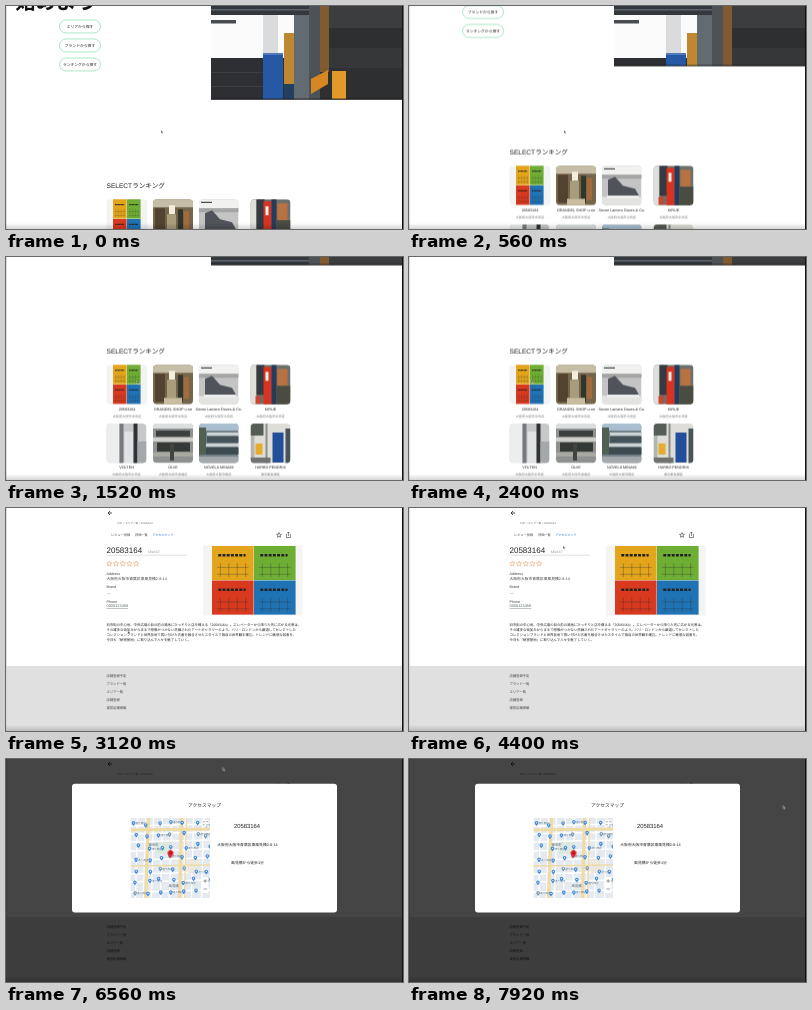
An HTML page that plays this animation: 397x223 px, repeating every 8 s.

```html
<!DOCTYPE html>
<html lang="ja">
<head>
<meta charset="utf-8">
<title>ショップ検索</title>
<style>
html, body { margin: 0; width: 100%; height: 100%; overflow: hidden; background: #fff; }
svg { display: block; width: 100vw; height: 100vh; text-rendering: geometricPrecision;
  font-family: "Liberation Sans", "Noto Sans CJK JP", "Noto Sans CJK", sans-serif; }
#scroll, #cursor { animation: 8s linear infinite; }
#scroll { animation-name: scroll; }
#cursor { animation-name: move; }
.late { opacity: 0; animation: 8s step-end infinite; }
#detail { animation-name: open-detail; }
#modal { animation-name: open-modal; }
#pin { animation-name: drop-pin; }
#roads { animation: pale 8s step-end infinite; }
@keyframes scroll {
  0% { transform: translateY(0); }
  1% { transform: translateY(-2px); }
  4% { transform: translateY(-15px); }
  7% { transform: translateY(-33.5px); }
  11% { transform: translateY(-61px); }
  15% { transform: translateY(-79px); }
  19%, 100% { transform: translateY(-85.5px); }
}
@keyframes move {
  0%, 12% { transform: translate(155px, 124.3px); }
  19%, 23% { transform: translate(131px, 124px); }
  29%, 45% { transform: translate(122px, 123px); }
  52%, 55% { transform: translate(154px, 38px); }
  58%, 70% { transform: translate(155.5px, 28px); }
  76% { transform: translate(184px, 12px); }
  82% { transform: translate(216.5px, 8.5px); }
  91% { transform: translate(312px, 5px); }
  95% { transform: translate(356px, 18px); }
  99%, 100% { transform: translate(374px, 46.5px); }
}
@keyframes open-detail { 0% { opacity: 0; } 34%, 100% { opacity: 1; } }
@keyframes open-modal { 0% { opacity: 0; } 60%, 100% { opacity: 1; } }
@keyframes drop-pin { 0% { opacity: 0; } 68%, 100% { opacity: 1; } }
@keyframes pale { 0% { stroke: #efc877; } 68%, 100% { stroke: #efdba6; } }
</style>
</head>
<body>
<svg id="stage" viewBox="0 0 397 223" preserveAspectRatio="none"></svg>
<script>
const shop = '20583164';
const address = '大阪府大阪市青葉区東風見橋2-8-14';

const rect = (x, y, w, h, fill, more = '') =>
  `<rect x="${x}" y="${y}" width="${w}" height="${h}" fill="${fill}" ${more}/>`;
const text = (x, y, size, str, fill = '#222', more = '') =>
  `<text x="${x}" y="${y}" font-size="${size}" fill="${fill}" ${more}>${str.replace(/&/g, '&amp;').replace(/>/g, '&gt;')}</text>`;
const middle = 'text-anchor="middle"';
const medium = 'font-weight="500"';
const line = (d, stroke, width = .6, more = '') =>
  `<path d="${d}" fill="none" stroke="${stroke}" stroke-width="${width}" ${more}/>`;

let seed = 11;
const random = () => (seed = seed * 16807 % 2147483647) / 2147483647;

// A rounded picture made of flat blocks: [colour, x, y, w, h]
let clips = 0;
function photo(x, y, w, h, back, blocks, radius = 4) {
  const id = 'clip' + clips++;
  return `<clipPath id="${id}">${rect(0, 0, w, h, '#000', `rx="${radius}"`)}</clipPath>
    <g transform="translate(${x} ${y})"><g clip-path="url(#${id})">${rect(0, 0, w, h, back)}
    ${blocks.map(([c, ...box]) => rect(...box, c)).join('')}</g></g>`;
}

function poster(x, y, w, h) {
  const colours = ['#e3a51c', '#6fae35', '#d8391f', '#1f73b5'];
  return colours.map((c, i) => {
    const tw = w / 2, th = h / 2, tx = x + i % 2 * tw, ty = y + (i >> 1) * th;
    const mark = `M${tx + tw * .15} ${ty + th * .27}h${tw * .65}`;
    const fence = `M${tx + tw * .12} ${ty + th * .62}h${tw * .75}m0 ${th * .2}h${-tw * .75}`;
    const posts = [.2, .4, .6, .8].map(k => `M${tx + tw * k} ${ty + th * .5}v${th * .4}`).join('');
    return rect(tx, ty, tw - .4, th - .4, c) +
      line(mark, '#222', h * .035, `stroke-dasharray="${tw * .07} ${tw * .03}"`) +
      line(fence + posts, '#333', h * .007, 'opacity=".7"');
  }).join('');
}

// Stays fixed while the page slides over its lower edge
function hero() {
  return photo(205, 0, 191, 94, '#2d2f31', [
    ['#fbfbfb', 0, 9, 84, 43], ['#33383f', 0, 0, 98, 9], ['#5d636b', 0, 3, 98, 1.5],
    ['#484b4f', 0, 14, 25, 3.5], ['#d9dbdc', 52, 9, 15, 38], ['#2d2f32', 0, 52.5, 52, 42],
    ['#3c3f42', 0, 66, 52, 1], ['#3c3f42', 0, 80, 52, 1], ['#2559a6', 52, 47, 20, 47],
    ['#4f7cb8', 52, 47, 20, 2], ['#bf8830', 73, 27, 10, 51], ['#24405f', 73, 78, 10, 16],
    ['#626a72', 83, 9, 15, 85], ['#4d5257', 98, 0, 11, 94], ['#805a30', 109, 0, 9, 66],
    ['#3b3d3f', 118, 0, 73, 22], ['#353739', 118, 42, 73, 20], ['#e0992a', 121, 65, 14, 28]
  ], 0) + '<path d="M305 73l17-9v14l-17 10z" fill="#d78624"/>';
}

function card(x, w, y, name, area, back, blocks) {
  const centre = x + w / 2;
  const picture = blocks ? photo(x, y, w, 39.5, back, blocks)
    : rect(x, y, w, 39.5, '#f3f3f3', 'rx="4"') + poster(x + 6.5, y, 28, 39.5);
  return picture + text(centre, y + 45.3, 3.75, name, '#222', middle) +
    text(centre, y + 52.3, 3.2, area, '#777', middle);
}

function listPage() {
  const buttons = ['エリアから探す', 'ブランドから探す', 'ランキングから探す'].map((s, i) =>
    rect(53.5, 14 + i * 19, 41, 13, '#fff', 'rx="6.5" stroke="#9adfb8" stroke-width=".8"') +
    text(74, 21.9 + i * 19, 3.8, s, '#222', middle + ' ' + medium)).join('');
  const top = 193.3, low = 252, osaka = '大阪府大阪市中央区';
  const cards = [
    card(100.5, 41, top, shop, osaka),
    card(147, 40, top, 'GRANDEL SHOP u-ne', osaka, '#75664b', [
      ['#c5bda5', 0, 0, 40, 8], ['#51432f', 2, 9, 10, 28], ['#f3eedc', 16, 6, 6, 9],
      ['#a89c7d', 14, 15, 9, 18], ['#30362c', 25, 10, 5, 27], ['#a36b3b', 31, 12, 5, 22],
      ['#c9bd9f', 11, 33, 18, 7]]),
    card(193, 39.5, top, 'Seven Lantern Doves & Co.', osaka, '#c3c4c3', [
      ['#f1f1ef', 0, 0, 40, 9], ['#44484a', 2, 2.5, 11, 1.2], ['#a4a6a5', 0, 9, 40, 4],
      ['#e3e3e1', 0, 31, 40, 9]]) +
      `<path d="M199 ${top + 30}v-16l7-3 8 9 12 3 4 7z" fill="#50545a"/>` +
      line(`M198 ${top + 31}h32`, '#f7f7f7', 2),
    card(244.5, 40, top, 'KIRUE', osaka, '#6c706b', [
      ['#dededa', 0, 0, 6, 40], ['#343a3f', 6, 0, 8, 30], ['#d63322', 13, 2, 8, 38],
      ['#f1eee8', 15, 7, 3, 9], ['#263b58', 21, 0, 5, 40], ['#b87242', 27, 4, 10, 17],
      ['#4a4c42', 26, 21, 14, 19], ['#c74630', 5, 31, 5, 8]]),
    card(100.5, 40, low, 'VOLTEN', osaka, '#c6c8c9', [
      ['#eceded', 0, 0, 13, 40], ['#777a7c', 13, 0, 4, 40], ['#e0e2e3', 18, 8, 9, 32],
      ['#303335', 27, 0, 4, 40], ['#a4a8aa', 31, 18, 9, 22]]),
    card(147, 40, low, 'OLVE', '大阪府大阪市浪速区', '#8e918f', [
      ['#dcdfdf', 0, 0, 40, 5], ['#3c403f', 3, 7, 34, 6], ['#d0d1cd', 0, 14, 40, 4],
      ['#343836', 4, 19, 33, 9], ['#aaa9a2', 0, 29, 40, 4], ['#41443f', 17, 20, 4, 17]]),
    card(193, 39.5, low, 'NOVELA MINAMI', '大阪府大阪市西区', '#718089', [
      ['#a9bfd0', 0, 0, 40, 7], ['#d0d4d4', 8, 9, 32, 3], ['#46535b', 8, 13, 32, 6],
      ['#cdd2d3', 4, 20, 36, 3], ['#3d4b50', 7, 24, 33, 7], ['#506052', 0, 4, 7, 27],
      ['#a3a9aa', 0, 33, 40, 7]]),
    card(244.5, 40, low, 'HARBO PENDRIX', '東京都目黒区', '#deddd8', [
      ['#565c56', 0, 0, 13, 12], ['#b4b6b2', 0, 12, 4, 28], ['#e6ac2e', 5, 20, 7, 11],
      ['#8b8e8b', 15, 0, 2, 40], ['#234e99', 22, 9, 11, 30], ['#4a5358', 35, 5, 5, 35],
      ['#6e7370', 0, 34, 20, 6]])
  ].join('');
  return rect(205, 93.5, 191, 230, '#fff') + rect(205, 92.7, 191, .9, '#111') +
    text(9, 3, 20.5, '始めよう', '#111', 'font-weight="700"') + buttons +
    text(100.5, 182, 6.6, 'SELECTランキング', '#222', medium) + cards;
}

function star(cx, cy, r) {
  return 'M' + Array.from({ length: 10 }, (_, i) => {
    const a = i * Math.PI / 5, k = i % 2 ? r * .45 : r;
    return `${cx + k * Math.sin(a)} ${cy - k * Math.cos(a)}`;
  }).join('L') + 'z';
}

function detailPage() {
  const story = [
    `旧市街の中心地、中央広場の目の前の路地にひっそりと店を構える『${shop}』。エレベーターから降りた先に広がる光景は、`,
    'その雑多な街並みからまるで想像がつかない洗練されたアートギャラリーのよう。パリ・ロンドンから厳選してセレクトした',
    'コレクションブランドと世界各地で買い付けた古着を融合させたスタイルで独自の世界観を確立。トレンドに敏感な若者を、',
    '今日も『秘密基地』に取り込んで人々を魅了していく。'];
  const links = ['店舗登録予定', 'ブランド一覧', 'エリア一覧', '店舗登録', '運営店舗掲載'];
  return rect(0, 0, 397, 223, '#fff') + rect(0, 158, 397, 65, '#e0e0e0') +
    line('M106 5h-4m2-2l-2 2 2 2', '#222', .8) +
    text(111, 16, 2.6, `TOP  >  エリア一覧  >  ${shop}`, '#666') +
    text(105, 28.4, 3.2, 'レビュー投稿', '#444') + text(129, 28.4, 3.2, '評価一覧', '#444') +
    text(146.5, 28.4, 3, 'アクセスマップ', '#1769e0', medium) +
    line(star(273, 27.2, 2.6), '#333', .6) +
    line('M280.4 26v3.6h4V26m-2 2v-4m-1.3 1.3l1.3-1.3 1.3 1.3', '#333', .6) +
    text(100.5, 45.2, 8, shop) + text(141.5, 45, 3.2, 'SELECT', '#888') +
    line('M101 47.2h80', '#ccc', .6) +
    [0, 1, 2, 3, 4].map(i => line(star(103.3 + i * 6.7, 55.8, 2.8), '#f0a574', .6)).join('') +
    text(100.5, 66.8, 3.7, 'Address', '#444') + text(100.5, 72.3, 3.8, address, '#444') +
    text(100.5, 80.3, 3.7, 'Brand', '#444') + text(101, 86.8, 3.7, 'ー', '#777') +
    text(100.5, 94.6, 3.7, 'Phone', '#444') +
    text(100.5, 99.3, 3.9, '0000123456', '#566', 'text-decoration="underline"') +
    rect(197, 37.5, 99.5, 70, '#f4f4f3') + poster(206, 38, 84, 69) +
    story.map((s, i) => text(100.5, 118.3 + i * 4.75, 3.4, s, '#222', medium)).join('') +
    links.map((s, i) => text(100.5, 168.7 + i * 8.05, 3.3, s, '#444')).join('');
}

function mapView() {
  const lanes = [7, 15, 23, 32, 41, 55, 63, 73].map(v =>
    `M${v} 0L${v - 2} 80M0 ${v + 1}L80 ${v - 1}`).join('');
  let shops = '';
  for (let i = 0; i < 48; i++) {
    const x = 3 + i % 7 * 12 + random() * 5, y = 3 + Math.floor(i / 7) * 11.5 + random() * 5;
    const fill = random() < .8 ? '#478bd9' : '#7899b0';
    shops += `<path d="M${x} ${y + 2.7}l-1.5-2a1.8 1.8 0 1 1 3 0z" fill="${fill}"/>
      <circle cx="${x}" cy="${y - .4}" r=".6" fill="#fff"/>`;
    if (i % 3 === 0) shops += text(x + 2, y + 1, 2.6, '通り商店', '#637789');
  }
  const clip = '<clipPath id="map-area"><path d="M0 0h79.5v80H0z"/></clipPath>';
  return clip + `<g transform="translate(124.5 59)"><g clip-path="url(#map-area)">
    ${rect(0, 0, 80, 80, '#e5eaf0')}${line(lanes, '#fff', 1.3)}
    ${rect(25, 24, 17, 12, '#dce9df')}${rect(57, 41, 11, 14, '#eee7dc')}
    <g id="roads" fill="none" stroke-width="3.2"><path d="M18 0l-3 80M51 0l-2 80M0 12l80-1"/>
    <path d="M56 0l-2 80M0 48l80-1" stroke-width="1.4"/></g>
    ${shops}${text(18, 28, 3.4, '御影町', '#546577')}${text(38, 69, 3.4, '風見橋', '#546577')}
    </g><g id="pin" class="late">
    <path d="M40 40.5l-2.1-3.6a2.8 2.8 0 1 1 4.2 0z" fill="#e01f2d"/>
    <circle cx="40" cy="35" r=".9" fill="#8c1018"/>
    ${rect(71.5, 2, 6.5, 6.5, '#fff')}${rect(71.5, 59, 6.5, 16, '#fff')}
    ${line('M73 4.3V3.5h1m2 0h1v.8m0 2V7h-1m-2 0h-1v-.8M73 63h3.5m-1.75-1.75v3.5M73 71h3.5', '#555', .6)}
    </g></g>`;
}

function modal() {
  return rect(0, 0, 397, 223, '#000', 'opacity=".73"') +
    rect(66, 24.8, 265, 128.7, '#fff', 'rx="3"') +
    text(198.5, 48.2, 4.75, 'アクセスマップ', '#222', middle + ' ' + medium) + mapView() +
    text(241, 68.8, 5.9, shop, '#222', middle) +
    text(241.5, 86.9, 3.8, address, '#222', middle + ' ' + medium) +
    text(241.5, 104.9, 3.85, '風見橋から徒歩1分', '#222', middle + ' ' + medium);
}

document.getElementById('stage').innerHTML = `
  <linearGradient id="shade" x2="0" y2="1"><stop stop-color="#000" stop-opacity="0"/>
  <stop offset="1" stop-color="#000" stop-opacity=".16"/></linearGradient>
  ${rect(0, 0, 397, 223, '#fff')}
  ${hero()}
  <g id="scroll">${listPage()}</g>
  <g id="detail" class="late">${detailPage()}</g>
  ${rect(0, 0, .8, 223, '#d8d8d8')}${rect(0, 217, 397, 6, 'url(#shade)')}
  <g id="modal" class="late">${modal()}</g>
  ${rect(396, 0, 1, 223, '#111')}
  <path id="cursor" d="M0 0v3l.7-.6.6 1.2.6-.3-.6-1.2h1z" fill="#333" stroke="#fff" stroke-width=".35"/>`;
</script>
</body>
</html>
```
